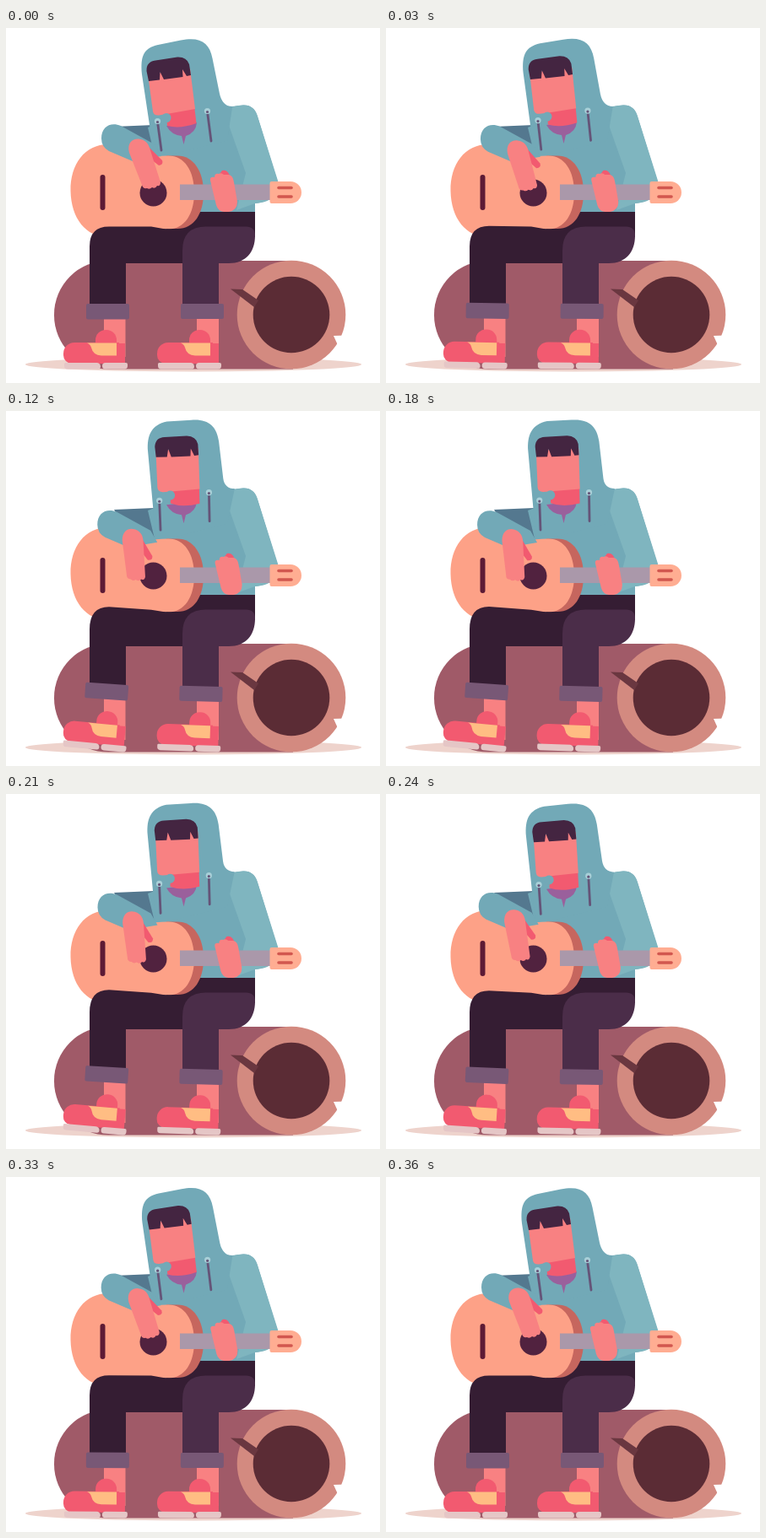
An HTML page with a canvas for the animation above (390 ms loop, 443 by 421 pixels).

```html
<!DOCTYPE html>
<html lang="en">
<head>
<meta charset="utf-8">
<title>Guitar player on a log</title>
<style>
html, body { margin: 0; width: 100%; height: 100%; overflow: hidden; background: #fff; }
canvas { display: block; width: 443px; height: 421px; }
</style>
</head>
<body>
<canvas id="stage" width="443" height="421"></canvas>
<script>
const ctx = document.getElementById('stage').getContext('2d');
const LOOP = 390, STEP = 30;
const C = {
  shadow: '#eed3cc', bark: '#a05a68', wood: '#d38a80', core: '#5b2c35', crack: '#6a3740',
  trousers: '#351d33', trousersLight: '#4b2d49', cuff: '#785876',
  skin: '#f88182', red: '#f25a70', yellow: '#ffbd83', sole: '#e5c6c6',
  hoodie: '#72a9b7', sleeve: '#7fb5bf', sleeveDark: '#54788f',
  guitar: '#fda187', guitarSide: '#c6665e', hole: '#51223f', bridge: '#5c1a35',
  neck: '#aa98aa', head: '#ffad92', peg: '#d2574f',
  hair: '#442541', collar: '#9a609c', cord: '#655478', ring: '#a9d0d8'
};

// Sway amount: quick rise, short hold, softer return.
const poses = [[0, 0], [60, .55], [120, .95], [160, 1], [210, .9], [270, .4], [330, .07], [360, 0], [390, 0]];
function swayAt(time) {
  let i = 0;
  while (i < poses.length - 2 && time > poses[i + 1][0]) i++;
  const slope = k => k <= 0 || k >= poses.length - 1 ? 0
    : (poses[k + 1][1] - poses[k - 1][1]) / (poses[k + 1][0] - poses[k - 1][0]);
  const [t0, v0] = poses[i], [t1, v1] = poses[i + 1];
  const d = t1 - t0, u = (time - t0) / d, u2 = u * u, u3 = u2 * u;
  return (2 * u3 - 3 * u2 + 1) * v0 + (u3 - 2 * u2 + u) * d * slope(i)
    + (3 * u2 - 2 * u3) * v1 + (u3 - u2) * d * slope(i + 1);
}

function shape(color, d) {
  ctx.fillStyle = color;
  ctx.fill(new Path2D(d));
}
function box(color, x, y, w, h, r = 0) {
  ctx.fillStyle = color;
  ctx.beginPath();
  ctx.roundRect(x, y, w, h, r);
  ctx.fill();
}
function disc(color, x, y, rx, ry = rx) {
  ctx.fillStyle = color;
  ctx.beginPath();
  ctx.ellipse(x, y, rx, ry, 0, 0, Math.PI * 2);
  ctx.fill();
}
function line(color, width, x1, y1, x2, y2) {
  ctx.strokeStyle = color;
  ctx.lineWidth = width;
  ctx.lineCap = 'round';
  ctx.beginPath();
  ctx.moveTo(x1, y1);
  ctx.lineTo(x2, y2);
  ctx.stroke();
}
function posed(px, py, degrees, dx, dy, draw) {
  ctx.save();
  ctx.translate(px + dx, py + dy);
  ctx.rotate(degrees * Math.PI / 180);
  ctx.translate(-px, -py);
  draw();
  ctx.restore();
}

function drawLog() {
  disc(C.shadow, 222, 399, 199, 8.5);
  box(C.bark, 57, 276, 283, 128.5, [64, 0, 0, 64]);
  disc(C.wood, 338, 340, 64.3);
  disc(C.core, 338, 340, 45.3);
  shape(C.crack, 'M266 309.5 L280 310 L299 323 L294 331Z');
  shape('#fff', 'M404 364.5 L388 365 L392.5 375 L398 375Z');
}

function drawTorso() {
  shape(C.sleeveDark, 'M128 117 L175 115 L184 158 L145 145Z');
  shape(C.hoodie, 'M168 118 L178 160 L225 218 L295 219 L295 208 C312 206 324 198 322 183'
    + ' L298 105 Q294 91 281 91.5 L268 93 L240 90Z');
  shape(C.sleeve, 'M261 107 Q260 94 275 92 L281 91.5 Q294 91 298 105 L322 181'
    + ' C325 199 312 207 295 208 L273 216 L284 172Z');
}

function drawHead(p) {
  const at = (x, y, dx, dy) => `${x + dx * p} ${y + dy * p} `;
  shape(C.hoodie, 'M' + at(176, 155, 2, 0) + 'L' + at(161, 55, 7.5, -7)
    + 'C' + at(159, 33, 8, -5) + at(163, 24, 10, -8) + at(180, 20, 11, -8)
    + 'L' + at(207, 14.5, 13, -4)
    + 'C' + at(230, 10, 10, -1) + at(241, 17, 9, 1) + at(244.5, 36, 8, 0)
    + 'L' + at(253, 78, 4.5, 2) + 'Q' + at(256, 92, 3, 0) + at(268, 94, 3, -2)
    + 'L262 134Z');
  posed(210, 120, 0, 0, -5 * p, () => {
    shape(C.collar, 'M190 116 L226 112 Q225 124 213 128 L210.5 138 L208 128 Q196 127 190 116Z');
  });
  posed(210, 120, 5.5 * p, 3.5 * p, -5 * p, () => {
    shape(C.red, 'M190 100 L223 92 L225.5 113 Q206 120 191 116Z');
    shape(C.skin, 'M168 55 L218 48 L224 96 L196 101 L181 103.5 Q175 104 174 99Z');
    disc(C.hoodie, 190, 106.5, 5.5);
    shape(C.hair, 'M169 63 L166.5 51 Q166 40 177 38.5 L203 34.5 Q214 34 217 43 L219 56'
      + ' L214 57 L209 49 L209.5 58 L187 61 L182.5 52 L182 61.5Z');
  });
  const leftY = 110.5 - 4.5 * p, rightY = 98.5 - 2 * p;
  for (const [x, y, endX, endY] of [
    [179.5 + 2.3 * p, leftY, 184 - p, 145 - 4 * p],
    [238.5 + 2 * p, rightY, 243 - 2 * p, 134 - 3.5 * p]
  ]) {
    line(C.cord, 2.8, x, y + 1, endX, endY);
    disc(C.ring, x, y, 3.6);
    disc(C.cord, x, y + 1, 1.6);
  }
}

function drawGuitar() {
  shape(C.guitarSide, 'M190 151.5 L203 151.5 C222 151.5 234 170 234 195 C234 220 223 238 203 238 L190 238Z');
  shape(C.guitar, 'M76.5 193 C76 162 93 138 121 138 C143 138 149 153 168 154'
    + ' Q176 151.5 192 151.5 C212 151.5 223 170 223 195 C223 220 212 238.5 192 238.5'
    + ' C170 238 145 248 121 248 C95 248 77 226 76.5 193Z');
  disc(C.hole, 174.5, 195.5, 16);
  line(C.bridge, 6, 114.5, 177, 114.5, 213);
  box(C.neck, 206, 185.5, 108, 18.5);
  box(C.head, 312.5, 182, 37.5, 26, [2, 13, 13, 2]);
  line(C.peg, 3.6, 323, 189.5, 338, 189.5);
  line(C.peg, 3.6, 323, 200, 338, 200);
}

function drawShoe(x, tilt, shift) {
  posed(x + 73, 404, tilt, shift, 0, () => {
    box(C.red, x + 38, 358, 25, 28, 12);
    box(C.red, x + 60, 374, 13, 24);
    box(C.red, x, 373, 66, 25, [13, 0, 0, 10]);
    shape(C.yellow, `M${x + 28} 373.5 H${x + 63} V388.5 H${x + 45} Q${x + 35} 388 ${x + 33} 379 Q${x + 32} 375 ${x + 28} 373.5Z`);
    box(C.sole, x + 1, 397, 43, 7.5, [2, 6, 4, 5]);
    box(C.sole, x + 46, 397, 30, 7.5, [4, 2, 4, 4]);
  });
}

function drawLegs(p) {
  box(C.skin, 116, 340, 25.5, 50);
  box(C.skin, 226, 340, 26, 50);
  drawShoe(68, 5.5 * p, -2 * p);
  drawShoe(179, 2 * p, -p);
  const thigh = 235.5 - 3.5 * p;
  shape(C.trousers, `M99 330 V259 Q99 ${thigh} 122 ${thigh} L172 ${235.5 + .3 * p}`
    + ' Q185 238.5 197 238.5 L240 238 L252 279 H142 V330Z');
  shape(C.trousersLight, 'M209 330 V264 Q209 235.5 237 235.5 H283 Q295 235 295 246 C295 266 284 279 264 279 H252 V330Z');
  posed(146, 330, 4 * p, -p, -2 * p, () => box(C.cuff, 95, 327, 51, 18.5, 2));
  posed(258, 330, 1.5 * p, -1.5 * p, 0, () => box(C.cuff, 207, 327, 51, 18, 2));
}

function drawStrummingArm(p) {
  posed(129, 131, 0, -5 * p, 4 * p, () => {
    shape(C.hoodie, 'M113 131 C113 117 124 111 136 116 L176 138 L184 152 L166 155 L150 158 L122 146 Q113 141 113 131Z');
  });
  posed(157, 140, 15 * p, -7 * p, 9 * p, () => {
    shape(C.red, 'M168 140 L185 157 Q187 162 181 163 L172 156Z');
    shape(C.skin, 'M146 148 C143 136 150 131 157 131.5 C165 132 169 137 171 145 L177 164'
      + ' L183 183 Q183 188 179 187 Q177 191 173 189 Q170 192 167 190 Q162 191 161 186Z');
  });
}

function drawFrettingHand(p) {
  posed(259, 195, 0, 6 * p, 0, () => {
    shape(C.red, 'M253 173 L256 169 Q263 167 266 178 L262 183Z');
    shape(C.skin, 'M242 181 Q241 176 247 177 Q247 172 252 173 Q255 171 258 174 L264 174'
      + ' Q269 175 270 183 L274 206 Q274 216 264 218 L258 218 Q251 217 249 210Z');
  });
}

function drawScene(time) {
  const p = swayAt(time);
  ctx.fillStyle = '#fff';
  ctx.fillRect(0, 0, 443, 421);
  drawLog();
  drawTorso();
  drawHead(p);
  box(C.trousers, 190, 218, 105, 30);
  drawGuitar();
  drawLegs(p);
  drawStrummingArm(p);
  drawFrettingHand(p);
}

let start = null;
function tick(now) {
  start ??= now;
  drawScene(Math.floor(((now - start) % LOOP) / STEP) * STEP);
  requestAnimationFrame(tick);
}
requestAnimationFrame(tick);
</script>
</body>
</html>
```
